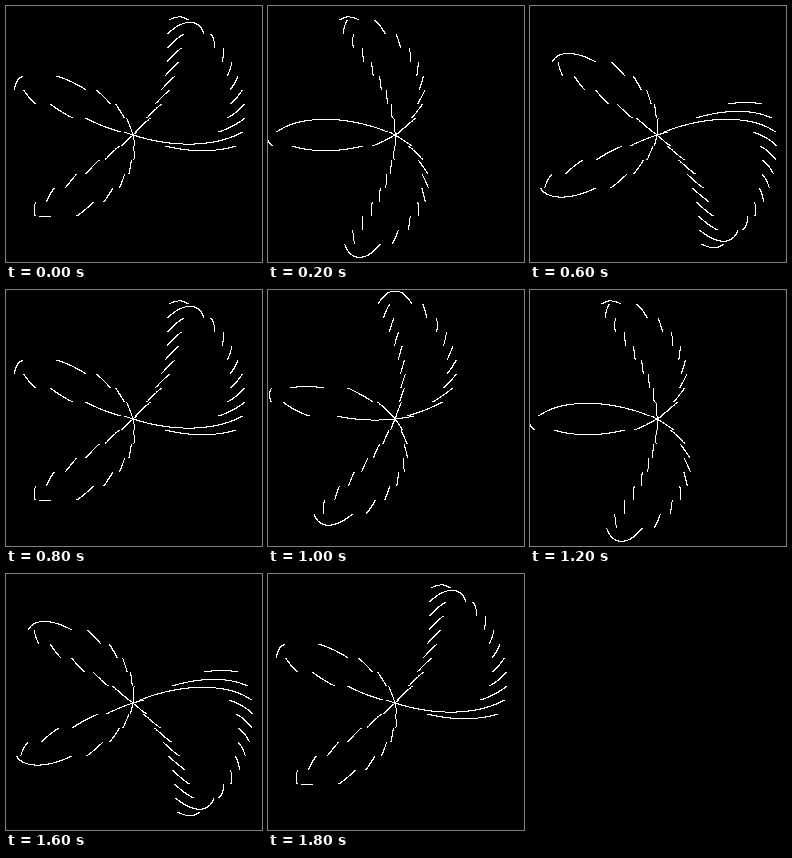
An HTML page with a canvas that plays this animation: 256x256 px, repeating every 1900 ms.

```html
<!DOCTYPE html>
<html lang="en">
<head>
<meta charset="utf-8">
<title>Sliced rose</title>
<style>
  html, body { margin: 0; width: 100%; height: 100%; overflow: hidden; background: #000; }
  canvas { display: block; width: 256px; height: 256px; image-rendering: pixelated; }
</style>
</head>
<body>
<canvas id="stage" width="256" height="256"></canvas>
<script>
const ctx = document.getElementById('stage').getContext('2d');
const STEP = 100, STEPS = 19;
const BANDS = 18, BAND_H = 14;
const CX = 127, CY = 129, R = 128;
const TURN = 12, LAG = 6;
const SAMPLES = 3000;
const rad = deg => deg * Math.PI / 180;

// Pixels of a three-petal rose, turned by an angle.
function rosePixels(angle) {
  const path = [];
  for (let i = 0; i < SAMPLES; i++) {
    const a = Math.PI * i / SAMPLES;
    const r = R * Math.cos(3 * a);
    path.push([
      Math.floor(CX + r * Math.cos(a + angle)),
      Math.floor(CY - r * Math.sin(a + angle))
    ]);
  }
  return path;
}

// Each lower band shows the turning rose a little earlier.
function draw(turn) {
  ctx.fillStyle = '#000';
  ctx.fillRect(0, 0, 256, 256);
  ctx.fillStyle = '#fff';
  for (let band = 0; band < BANDS; band++) {
    const angle = rad(90 + TURN * turn - LAG * band);
    for (const [x, y] of rosePixels(angle)) {
      if (Math.floor(y / BAND_H) === band) ctx.fillRect(x, y, 1, 1);
    }
  }
}

const start = performance.now();
let shown = -1;

function tick() {
  const step = Math.floor((performance.now() - start) / STEP) % STEPS;
  if (step !== shown) {
    shown = step;
    draw(step || STEPS - 1); // the loop opens on its closing pose
  }
  requestAnimationFrame(tick);
}
tick();
</script>
</body>
</html>
```
